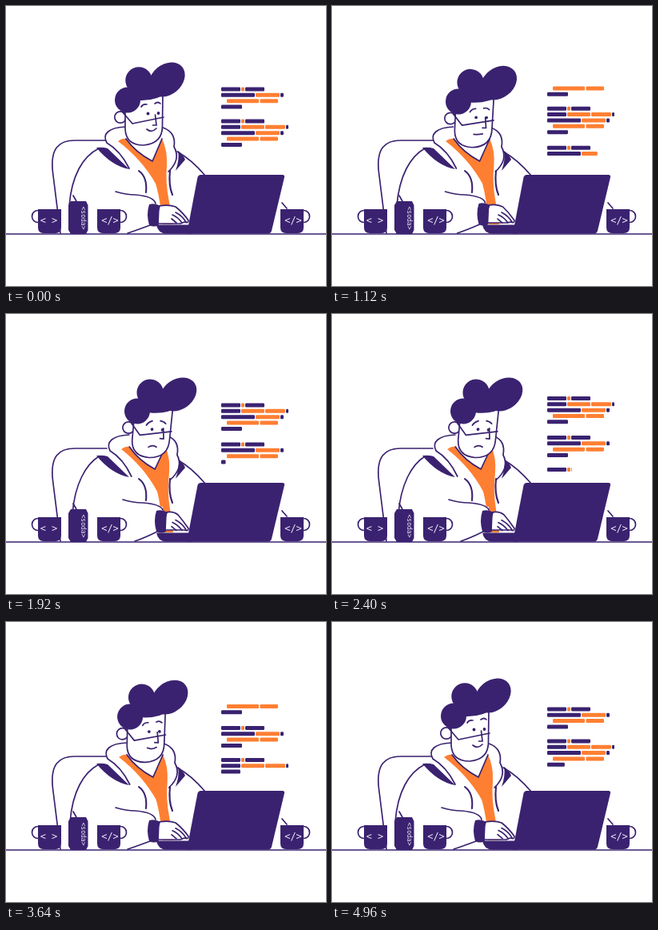
An HTML page for the animation above (5 s loop, 400 px wide and 350 px high).

```html
<!DOCTYPE html>
<html lang="en">
<head>
<meta charset="utf-8">
<title>Developer at work</title>
<style>
  html, body { margin: 0; width: 100%; height: 100%; overflow: hidden; background: #fff; }
  svg { display: block; width: 100vw; height: 100vh; }
  .line { fill: none; stroke: #3a2270; stroke-width: 1.7; stroke-linecap: round; stroke-linejoin: round; }
  .skin { fill: #fff; }
  .thick { stroke-width: 2.1; }
  .ink { fill: #3a2270; }
  .hot { fill: #ff7f32; }
  text { fill: #e9e4f4; font: 12px "DejaVu Sans Mono", monospace; text-anchor: middle; }
  .label { font-size: 8px; }
</style>
</head>
<body>
<svg viewBox="0 0 400 350">
  <defs>
    <g id="mug">
      <circle class="line" cx="29" cy="9" r="7.500"/>
      <path class="ink" d="M0 0H29V23Q29 30 22 30H7Q0 30 0 23Z"/>
    </g>
  </defs>

  <path class="line" d="M68 284L58.500 208C55 178 66 168 86 168H126"/>

  <path class="skin" d="M130 172Q88 190 82 225L79 284H210L249 212Q232 192 211 180Z"/>
  <path class="line" id="back"/>
  <path class="line" d="M214 182Q232 192 249 212"/>
  <path class="line" d="M84 237L88 244M345 246L351 253"/>
  <path class="ink" d="M113 177Q121 176 127 178L154 204Q132 200 113 177Z"/>
  <path class="ink" d="M215 181Q221 185 224 192L212 206Q217 192 215 181Z"/>

  <g id="collar">
    <path class="skin" d="M149 151Q120 154 125 168Q146 180 166 207L203 207Q217 190 211 174Q212 159 196 152Z"/>
    <path class="line" d="M149 151C128 152 120 160 126 171Q143 181 154 203M196 152Q213 158 210 176Q219 192 203 207"/>
    <path class="hot" d="M140 169Q145 165 150 166Q162 183 183 194L195 166Q202 180 201 200Q199 220 204 245L209 273H196Q192 238 187 222Q170 192 140 169Z"/>
    <path class="line" d="M150 166Q162 183 183 194L195 166"/>
  </g>
  <path class="line thick" d="M166 206Q177 214 175 233M205 206Q203 224 208 236"/>

  <g id="head">
    <circle class="skin line" cx="143" cy="139" r="7.200"/>
    <path class="skin line" d="M149 128V154Q150 174 172 174Q196 172 195.500 149L196 108H160Z"/>
    <path class="line" d="M146 133L158 147L197 139M186.500 136L188 149H183.500"/>
    <g class="ink">
      <circle cx="152" cy="117.500" r="16"/>
      <circle cx="166" cy="93" r="16.700"/>
      <ellipse cx="201" cy="92" rx="25" ry="18.800" transform="rotate(-40 201 92)"/>
      <path d="M152 108L166 93L185 87L206 106Q188 119 167 118L160 126Z"/>
    </g>
    <g class="ink" id="eyes">
      <circle cx="177.500" cy="134.500" r="1.900"/>
      <circle cx="190.500" cy="134" r="1.900"/>
    </g>
    <path class="line" id="brows"/>
    <path class="line" id="mouth"/>
  </g>

  <path class="ink" d="M188 273.500H232V284.500H200Q190 284 188 273.500Z"/>
  <path class="ink" d="M243.500 211H345.500Q348.500 211 348 214L332 281Q331 284.500 327 284.500H226L239.500 214Q240.500 211 243.500 211Z"/>

  <path class="skin" id="sleeve"/>
  <path class="line" id="seams"/>
  <path class="skin line" id="hand"/>
  <path class="line" id="fingers" d="M208 261Q215 264 220 271M212 258Q220 262 225 270M207 266L213 271"/>
  <path class="ink" id="cuff" d="M179 248Q186 246 193 250Q188 262 191 274Q185 277 179 274Q175 260 179 248Z"/>

  <g id="code"></g>

  <use href="#mug" transform="translate(69 254) scale(-1 1)"/>
  <use href="#mug" x="114" y="254"/>
  <use href="#mug" x="343" y="254"/>
  <text x="53.500" y="272">&lt; &gt;</text>
  <text x="130" y="272">&lt;/&gt;</text>
  <text x="359" y="272">&lt;/&gt;</text>
  <path class="ink" d="M81 244H100L102.500 249V280L100 285H81L78 280V249Z"/>
  <text class="label" transform="translate(94 265) rotate(90)">&lt;soda&gt;</text>
  <path class="line" d="M0 285H400"/>
</svg>
<script>
const LOOP = 5000, PITCH = 7.35, LEFT = 269, TOP = 98, SPEED = 0.0178;
const NS = "http://www.w3.org/2000/svg";
const $ = id => document.getElementById(id);

// Each bar: offset, width, highlighted
const LINES = {
  A: [[0, 24], [25, 4, 1], [30, 24]],
  B: [[0, 42], [43, 30, 1], [74, 4]],
  C: [[7, 40, 1], [48.5, 22.5, 1]],
  D: [[0, 26]],
  E: [[0, 24], [25, 29, 1], [55, 25, 1], [81, 3]]
};
// Each block: lines, starting height, typed during the loop
const BLOCKS = [["ABCD", 104], ["AEBCD", 144], ["ABCD", 193, 1], ["AEBCD", 233, 1]];

const bars = [];
let total = 0;
for (const [lines, top, typed] of BLOCKS) {
  [...lines].forEach((key, i) => {
    const line = LINES[key], start = line[0][0], last = line[line.length - 1];
    const y = top + i * PITCH - 2.5;
    for (const [x, w, hot] of line) {
      const el = document.createElementNS(NS, "rect");
      el.setAttribute("class", hot ? "hot" : "ink");
      el.setAttribute("x", LEFT + x);
      el.setAttribute("y", y);
      el.setAttribute("height", 5);
      el.setAttribute("rx", 1.3);
      $("code").append(el);
      bars.push({ el, y, w, from: typed ? total + x - start : -1000 });
    }
    if (typed) total += last[0] + last[1] - start;
  });
}

const clamp = (v, hi) => Math.max(0, Math.min(hi, v));
const ease = (t, a, b) => {
  const u = clamp((t - a) / (b - a), 1);
  return u * u * (3 - 2 * u);
};
const transform = (id, value) => $(id).setAttribute("transform", value);
const draw = (id, d) => $(id).setAttribute("d", d);

function drawCode(t) {
  const typed = (t - 20) / (LOOP - 20) * total;
  const scroll = SPEED * t - 4.2 * (1 - Math.exp(-t / 200));
  for (const { el, y, w, from } of bars) {
    el.setAttribute("width", y - scroll < TOP ? 0 : clamp(typed - from, w));
  }
  transform("code", `translate(0 ${-scroll})`);
}

function drawPerson(t) {
  const lean = ease(t, 760, 1480) - ease(t, 3160, 3880);
  const reach = ease(t, 760, 1480) - ease(t, 3160, 3640)
    + 0.8 * (ease(t, 4040, 4360) - ease(t, 4480, 4800));

  transform("head", `translate(${6.8 * lean} ${5.5 * lean}) rotate(${5.2 * lean} 172 174)`);
  transform("eyes", `translate(${-5 * lean} ${4 * lean})`);
  transform("collar", `translate(${10.9 * lean} 0) skewX(${-2.29 * lean})`);

  const b = 8 * lean, tilt = 3 * lean;
  draw("brows", `M${169 - b / 2} ${126 + b}Q${171 - b / 2} ${122 + b} ${176 - b / 2} ${123 + b - tilt}
    M${186 - b / 2} ${122 + b - tilt}Q${190 - b / 2} ${119 + b} ${193 - b / 2} ${122 + b}`);
  draw("mouth", `M${176 - 6 * lean} ${154 + 7 * lean}
    Q${182 - 7 * lean} ${159 - 2 * lean} ${188 - 8 * lean} ${153 + 7 * lean}`);
  const s = 4 * lean;
  draw("back", `M116 178C${96 + s} 188 ${82 + s} 212 ${79 + s} 250`);

  const x = 9 * reach, y = -2 * reach;
  draw("sleeve", `M140 233L${187 + x} 241V${275 + y}H${181 + x}L${152 + x} 284Z`);
  draw("seams", `M${137 + x} 232Q${150 + x} 236 ${162 + x} 236Q${185 + x} 238 ${187 + x} ${247 + y}
    M${152 + x} 284Q${164 + x} 280 ${180 + x} ${274 + y}`);
  draw("hand", `M${191 + x} ${250 + y}Q${204 + x / 2} ${248 + y} ${212 + x / 3} 251
    Q221 258 228 268Q228 272 223 270L218 ${272 + y}H${190 + x}Z`);
  transform("fingers", `translate(0 ${0.5 * Math.sin(t * Math.PI / 125)})`);
  transform("cuff", `translate(${x} ${y})`);
}

const begin = performance.now();
function tick() {
  const t = (performance.now() - begin) % LOOP;
  drawCode(t);
  drawPerson(t);
  requestAnimationFrame(tick);
}
tick();
</script>
</body>
</html>
```
